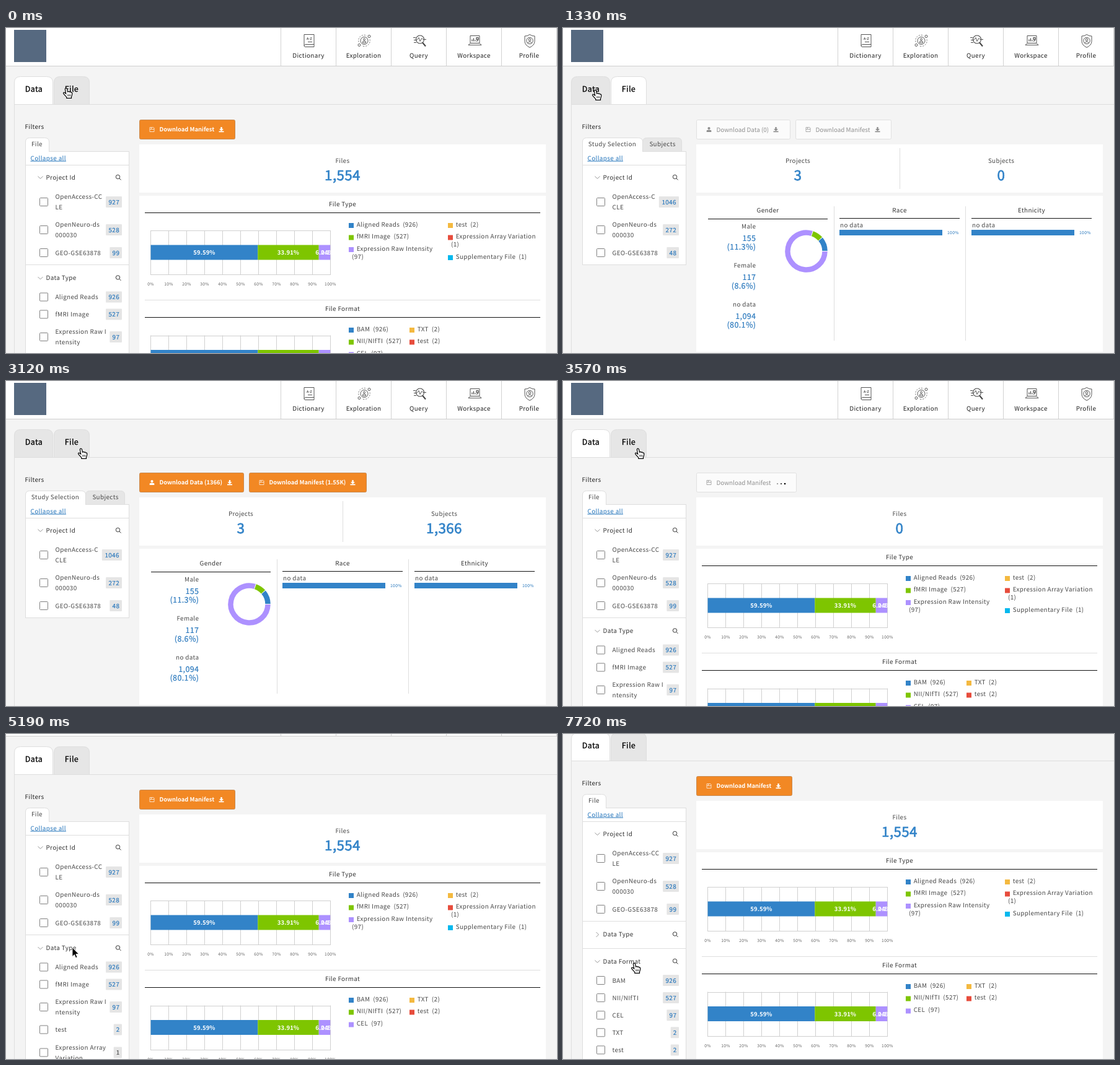
Animation, 889 px wide and 525 px high, one loop 8000 ms. Source, as an HTML page:

```html
<!DOCTYPE html>
<html lang="en">
<head>
<meta charset="utf-8">
<title>Data explorer</title>
<style>
  html, body { margin: 0; width: 100%; height: 100%; overflow: hidden; background: #f4f4f4; }
  svg { display: block; }
  text {
    font-family: "Noto Sans CJK SC", "Noto Sans CJK JP", "Noto Sans CJK", "Open Sans", sans-serif;
    letter-spacing: .38px; white-space: pre; text-rendering: geometricPrecision;
  }
</style>
</head>
<body>
<svg id="stage" width="889" height="525" viewBox="0 0 889 525"></svg>
<script>
const LOOP = 8000;
const BLUE = '#3283c8', GREEN = '#7ec500', PURPLE = '#ad91ff', YELLOW = '#f4b940',
      RED = '#e74c3c', CYAN = '#05b8ee', ORANGE = '#f28824',
      GRAY = '#e6e6e6', LINE = '#dedede', TEXT = '#484848', LINK = '#2374bb';
const BODY = 9.85, BIG = 22.4, MID = 12.5, TINY = 6.7;

// Cursor steps: time, hot spot x, y, shape
const cursorSteps = [
  [0, 97, 97, 'hand'], [140, 88, 99, 'hand'], [290, 70, 101, 'hand'], [440, 57, 101, 'hand'],
  [590, 52, 100, 'hand'], [1930, 60, 120, 'hand'], [2380, 69, 109, 'hand'], [2520, 92, 111, 'hand'],
  [2670, 118, 113, 'hand'], [2820, 130, 114, 'hand'], [3120, 121, 109, 'hand'],
  [4310, 120, 142, 'arrow'], [4460, 115, 215, 'arrow'], [4600, 110, 300, 'arrow'],
  [4750, 108, 336, 'arrow'], [4900, 107, 345, 'arrow'], [5490, 105, 345, 'arrow'],
  [5640, 98, 343, 'arrow'], [5790, 88, 340, 'arrow'], [5930, 76, 336, 'arrow'],
  [6080, 67, 332, 'arrow'], [6230, 60, 328, 'hand'], [6380, 57, 326, 'hand'],
  [7130, 62, 331, 'hand'], [7280, 78, 344, 'hand'], [7430, 97, 358, 'hand'],
  [7570, 110, 367, 'hand'], [7720, 115, 370, 'hand'],
];
const scrollSteps = [[0, 0], [4900, 4], [5050, 24], [5190, 58], [5340, 80]];
const pageSteps = [
  [0, 'file', 'ready'], [1190, 'data', 'empty'], [1480, 'data', 'loading'], [2380, 'data', 'ready'],
  [3420, 'file', 'empty'], [3720, 'file', 'ready'], [6680, 'file', 'folded'],
];
const at = (steps, t) => steps.findLast(step => step[0] <= t);

// Drawing helpers; text is placed by the centre of its capitals, "heavy" thickens its strokes
const text = (x, y, s, { size = BODY, fill = TEXT, anchor = 'start', heavy = 0, more = '' } = {}) =>
  `<text x="${x}" y="${y + size * .367}" font-size="${size}" fill="${fill}" text-anchor="${anchor}"`
  + `${heavy ? ` stroke="${fill}" stroke-width="${heavy}"` : ''} ${more}>${s}</text>`;
const mid = (x, y, s, o) => text(x, y, s, { anchor: 'middle', ...o });
const rect = (x, y, w, h, fill, more = '') =>
  `<rect x="${x}" y="${y}" width="${w}" height="${h}" fill="${fill}" ${more}/>`;
const path = (d, stroke, fill = 'none', width = 1) =>
  `<path d="${d}" stroke="${stroke}" fill="${fill}" stroke-width="${width}"/>`;
const move = (x, y, s) => `<g transform="translate(${x} ${y})">${s}</g>`;
const hline = (x1, x2, y, color = LINE) => rect(x1, Math.round(y), x2 - x1, 1, color);
const vline = (x, y1, y2, color = LINE) => rect(x, y1, 1, y2 - y1, color);

const tab = (x, y, w, h, r, fill) =>
  path(`M${x + .5} ${y + h}V${y + r}q0 ${.5 - r} ${r} ${.5 - r}H${x + w - r - .5}q${r} 0 ${r} ${r - .5}V${y + h}`, LINE, fill);

const INK = '#444';
const ring = (x, y, r, width = .9) =>
  `<circle cx="${x}" cy="${y}" r="${r}" fill="none" stroke="${INK}" stroke-width="${width}"/>`;
const navIcons = {
  Dictionary: path('M-8 -10H8V10H-6Q-8 10 -8 8ZM-8 8Q-7 6 -5 6H8M-2 2H5', INK, 'none', .9)
    + mid(.5, -3, 'A-Z', { size: 5, fill: INK, more: 'font-weight="700"' }),
  Exploration: ring(0, 0, 6) + ring(0, -2, 1.5)
    + path('M-2.5 3.5V1.5Q0 -.5 2.5 1.5V3.5Z', INK, 'none', .9)
    + ring(-8, 7, 2) + ring(8, -7, 2)
    + `<path d="M-9 2A9 9 0 0 1 4 -8M9 -2A9 9 0 0 1 -4 8" fill="none" stroke="${INK}" stroke-width=".8" stroke-dasharray="2 2"/>`,
  Query: ring(1, -2, 6.5, 1.1)
    + path('M-9 -1H-4L-1 -5L1 1L4 -4L6 -2H11M-10 -5H-6M-9 3H-5', INK, 'none', .9)
    + path('M5 3L10 9', INK, 'none', 2),
  Workspace: path('M-7 -8H8V4H-7ZM-10 7H11L8 4H-7Z', INK, 'none', .9)
    + path('M-4 1V-2M-1.5 1V-4M1 1V-1M3 -5H6V-2H3ZM3 1L6 -1', INK, 'none', 1.2),
  Profile: path('M0 -10Q4 -7 8 -7.5V1Q8 7 0 11Q-8 7 -8 1V-7.5Q-4 -7 0 -10Z', INK, 'none', .9)
    + ring(0, 0, 5.2) + ring(0, -1.5, 1.8) + path('M-3.5 4Q0 -1 3.5 4', INK, 'none', .9),
};

function header(page, cursorX, cursorY) {
  const hovered = cursorY > 78 && cursorY < 123 ? (cursorX < 77 ? 'data' : cursorX < 135 ? 'file' : '') : '';
  const shade = name => name === page || name === hovered ? GRAY : '#fff';
  const label = { size: MID, fill: '#000', heavy: .3 };
  return rect(0, 0, 889, 61, '#fff') + hline(0, 889, 61, '#cfcfcf')
    + rect(13, 3, 52, 52, '#566980')
    + Object.entries(navIcons).map(([name, icon], i) =>
        vline(443 + 89 * i, 0, 61, '#d2d2d2') + move(489 + 89 * i, 20.5, icon)
        + mid(488 + 89 * i, 44, name, { fill: '#222' })).join('')
    + vline(888, 0, 61, '#d2d2d2')
    + hline(13, 889, 123) + vline(13, 123, 700)
    + tab(13, 78, 63, 45, 10, shade('data')) + tab(77, 78, 58, 45, 10, shade('file'))
    + mid(45, 98, 'Data', label) + mid(106, 98, 'File', label)
    + text(30.5, 159, 'Filters', { fill: '#222' });
}

const icons = {
  person: c => `<circle cy="-2" r="2.1" fill="${c}"/>` + path('M-3.8 4V2Q-3.8 .5 0 .5Q3.8 .5 3.8 2V4Z', 'none', c),
  file: c => path('M-3.5 -3.5H2.5L3.5 -2.5V3.5H-3.5ZM-3.5 -.5H3.5M-1 -3.5V-1', c, 'none', .7),
  download: c => path('M-1.2 -4H1.2V-1H3.5L0 2.4L-3.5 -1H-1.2ZM-4 2.5H4V4.2H-4Z', 'none', c),
};

function button(x, w, icon, label, endX, state) {
  const on = state === 'on', color = on ? '#fff' : '#8f8f8f';
  const dots = [[346, .9, '#777'], [352, 1.1, '#222'], [358, 1.3, '#000']]
    .map(([cx, r, c]) => `<circle cx="${cx - 215 + x}" cy="166" r="${r}" fill="${c}"/>`).join('');
  return rect(x + .5, 148.5, w - 1, 31, on ? ORANGE : '#fbfbfb', `rx="2" stroke="${on ? '#c98a50' : '#e0e0e0'}"`)
    + move(x + 20.5, 164, icons[icon](color))
    + text(x + 32.5, 164, label, {
        size: on ? 9.4 : BODY, fill: color,
        more: `font-weight="${on ? 600 : 400}" style="letter-spacing:0"` })
    + (state === 'loading' ? dots : move(endX, 164, icons.download(color)));
}

function filterHead(y, title, open = true) {
  return move(55.5, y + .5, path(open ? 'M-4 -2L0 2L4 -2' : 'M-2 -4L2 0L-2 4', '#999'))
    + text(64.5, y, title, { fill: '#333' })
    + move(181, y, '<circle cx="-.5" cy="-.5" r="3.2" fill="none" stroke="#333"/>' + path('M2 2L4.5 4.5', '#333'));
}

function filterItem(y, label, count) {
  const lines = label.split('|'), w = 7 + 6.3 * String(count).length;
  return rect(54.5, y - 6.5, 13, 13, '#fff', 'rx="1" stroke="#808080"')
    + lines.map((s, i) => text(79.5, y + (lines.length > 1 ? 17 * i - 8.5 : 0), s)).join('')
    + rect(187 - w, y - 9, w, 18, '#e5e5e5', 'rx="1"')
    + mid(187.2 - w / 2, y, count, { fill: count === 1 ? TEXT : LINK, heavy: .15 });
}
const items = list => list.map(item => filterItem(...item)).join('');

function sidebar(height, projects) {
  return rect(31.5, 199.5, 167, height, '#fff', `stroke="${LINE}"`) + hline(32, 198, 221)
    + text(39.5, 210, 'Collapse all', { fill: LINK, more: 'text-decoration="underline"' })
    + filterHead(241, 'Project Id') + items(projects);
}

const stat = (x, label, value) => mid(x, 214, label)
  + mid(x, 238, value, { size: BIG, fill: BLUE, heavy: .7 });

function legend(x, y, color, label, count, wrapDy) {
  const s = wrapDy ? label : `${label}<tspan dx="5">(${count})</tspan>`;
  return rect(x, y - 2, 8, 8, color) + text(x + 12.7, y, s)
    + (wrapDy ? text(x + 5, y + wrapDy, `(${count})`) : '');
}

function barChart(y, title) {
  const value = (x, s) => mid(x, y + 79, s, { size: 9.5, fill: '#fff', more: 'font-weight="600" style="letter-spacing:.1px"' });
  let s = mid(543, y, title, { fill: '#333' }) + hline(224, 862, y + 13.6, '#111')
    + hline(233, 524, y + 43, '#d0d0d0') + hline(233, 524, y + 114, '#d0d0d0');
  for (let i = 0; i <= 10; i++)
    s += vline(233 + 29 * i, y + 43, y + 115, '#d0d0d0')
      + mid(233.5 + 29 * i, y + 130, i * 10 + '%', { size: TINY, fill: '#666' });
  return s + rect(233.5, y + 66.5, 172.8, 24, BLUE) + rect(406.3, y + 66.5, 98.4, 24, GREEN)
    + rect(504.7, y + 66.5, 18.5, 24, PURPLE)
    + value(320, '59.59%') + value(455.5, '33.91%') + value(514, '6.24%') + value(523, '0.13%');
}

function filePage(state) {
  const empty = state === 'empty';
  const formats = [['BAM', 926], ['NII/NIfTI', 527], ['CEL', 97], ['TXT', 2], ['test', 2]];
  const lower = state === 'folded'
    ? filterHead(403.5, 'Data Type', false) + hline(32, 198, 426) + filterHead(447, 'Data Format')
      + items(formats.map(([name, n], i) => [478 + 28.1 * i, name, n]))
    : filterHead(403.5, 'Data Type')
      + items([[434.5, 'Aligned Reads', 926], [462.5, 'fMRI Image', 527], [499, 'Expression Raw I|ntensity', 97],
               [535.5, 'test', 2], [572.5, 'Expression Array|Variation', 1]]);
  return sidebar(500, [[281, 'OpenAccess-CC|LE', 927], [326, 'OpenNeuro-ds|000030', 528], [363, 'GEO-GSE63878', 99]])
    + tab(31, 177, 39, 23, 7, '#fff') + mid(50, 187.3, 'File')
    + hline(32, 198, 382) + lower
    + button(215, empty ? 162 : 155, 'file', 'Download Manifest', 347.5, empty ? 'loading' : 'on')
    + rect(215, 188, 656, 78, '#fff') + stat(543, 'Files', empty ? '0' : '1,554')
    + rect(215, 271, 656, 400, '#fff')
    + barChart(284, 'File Type') + hline(224, 862, 439) + barChart(453.5, 'File Format')
    + legend(553, 317, BLUE, 'Aligned Reads', 926) + legend(553, 336.5, GREEN, 'fMRI Image', 527)
    + legend(553, 356, PURPLE, 'Expression Raw Intensity', 97, 13.5)
    + legend(713, 317, YELLOW, 'test', 2) + legend(713, 336.5, RED, 'Expression Array Variation', 1, 13)
    + legend(713, 369, CYAN, 'Supplementary File', 1)
    + legend(553, 486, BLUE, 'BAM', 926) + legend(553, 505.5, GREEN, 'NII/NIfTI', 527)
    + legend(553, 525.5, PURPLE, 'CEL', 97)
    + legend(651, 486, YELLOW, 'TXT', 2) + legend(651, 505.5, RED, 'test', 2);
}

function donut(cx, cy, r, parts) {
  const point = a => `${cx + r * Math.cos(a)} ${cy - r * Math.sin(a)}`;
  let start = 0;
  return parts.map(([share, color]) => {
    const end = start + share * 2 * Math.PI, pad = .015;
    const d = `M${point(start + pad)}A${r} ${r} 0 ${share > .5 ? 1 : 0} 0 ${point(end - pad)}`;
    start = end;
    return path(d, color, 'none', 8.5);
  }).join('');
}

const genders = [['Male', '155', '(11.3%)'], ['Female', '117', '(8.6%)'], ['no data', '1,094', '(80.1%)']];

function dataPage(state) {
  const value = { size: MID, fill: LINK, anchor: 'end', heavy: .15 };
  const fullBar = (x, title) => mid(x + 97, 294, title, { fill: '#333' }) + hline(x, x + 194, 307, '#111')
    + text(x + 1, 318, 'no data') + rect(x, 326, 166, 9, BLUE)
    + text(x + 174, 331, '100%', { size: TINY, fill: LINK });
  const buttons = {
    empty: () => button(215, 152, 'person', 'Download Data (0)', 343.5, 'off')
      + button(375, 155, 'file', 'Download Manifest', 507.5, 'off'),
    loading: () => button(215, 169, 'person', 'Download Data (1366)', 361, 'on')
      + button(392, 162, 'file', 'Download Manifest', 0, 'loading'),
    ready: () => button(215, 169, 'person', 'Download Data (1366)', 361, 'on')
      + button(392, 190, 'file', 'Download Manifest (1.55K)', 559.5, 'on'),
  };
  return sidebar(183, [[281, 'OpenAccess-C|CLE', 1046], [326, 'OpenNeuro-ds|000030', 272], [363, 'GEO-GSE63878', 48]])
    + tab(128, 177, 64, 22, 7, GRAY) + tab(31, 177, 98, 23, 7, '#fff')
    + mid(79.5, 187.3, 'Study Selection') + mid(160.5, 187.3, 'Subjects')
    + buttons[state]()
    + rect(215, 188, 656, 78, '#fff') + vline(543, 194, 260)
    + stat(379, 'Projects', '3') + stat(707, 'Subjects', state === 'empty' ? '0' : '1,366')
    + rect(215, 271, 656, 252, '#fff') + vline(437, 288, 505) + vline(649, 288, 505)
    + mid(330.5, 294, 'Gender', { fill: '#333' }) + hline(234, 427, 308, '#111')
    + genders.map(([name, n, share], i) => text(311.4, 320.5 + 63 * i, name, { anchor: 'end' })
        + text(311.4, 339.5 + 63 * i, n, value) + text(311.4, 353.5 + 63 * i, share, value)).join('')
    + donut(392.5, 360.5, 30, [[.113, BLUE], [.086, GREEN], [.801, PURPLE]])
    + fullBar(446, 'Race') + fullBar(659, 'Ethnicity');
}

const cursors = {
  hand: path('M-1.6 1.8C-1.8 -.3 1 -.3 1.5 1.6L2.5 6C3.2 4.9 5 5.2 5.3 6.4C6.2 5.5 7.7 5.9 8 7.2C9 6.6 9.8 7.4 9.8 8.6C9.8 12 9 13 8.5 14.2V16.4H.8V14.8C-.8 13 -3 10.6 -4.3 8.8C-4.8 7.4 -3.6 6.7 -2.4 7.6L-.3 9.2Z', '#000', '#fff', 1.2)
    + path('M2.8 10.3V13.3M4.8 10.3V13.3M6.8 10.3V13.3', '#000', 'none', .8),
  arrow: path('M0 0V14.5L3.4 11.4L5.6 16.6L8 15.6L5.8 10.6H10.4Z', '#fff', '#000', .8),
};

const stage = document.getElementById('stage');
let shown = '';

function draw() {
  const t = performance.now() % LOOP;
  const [, x, y, shape] = at(cursorSteps, t), [, scroll] = at(scrollSteps, t), [, page, state] = at(pageSteps, t);
  const key = [x, y, shape, scroll, page, state].join();
  if (key !== shown) {
    shown = key;
    stage.innerHTML = rect(0, 0, 889, 525, '#f4f4f4')
      + move(0, -scroll, header(page, x, y + scroll) + (page === 'file' ? filePage(state) : dataPage(state)))
      + move(x, y, cursors[shape]);
  }
  requestAnimationFrame(draw);
}
draw();
</script>
</body>
</html>
```
